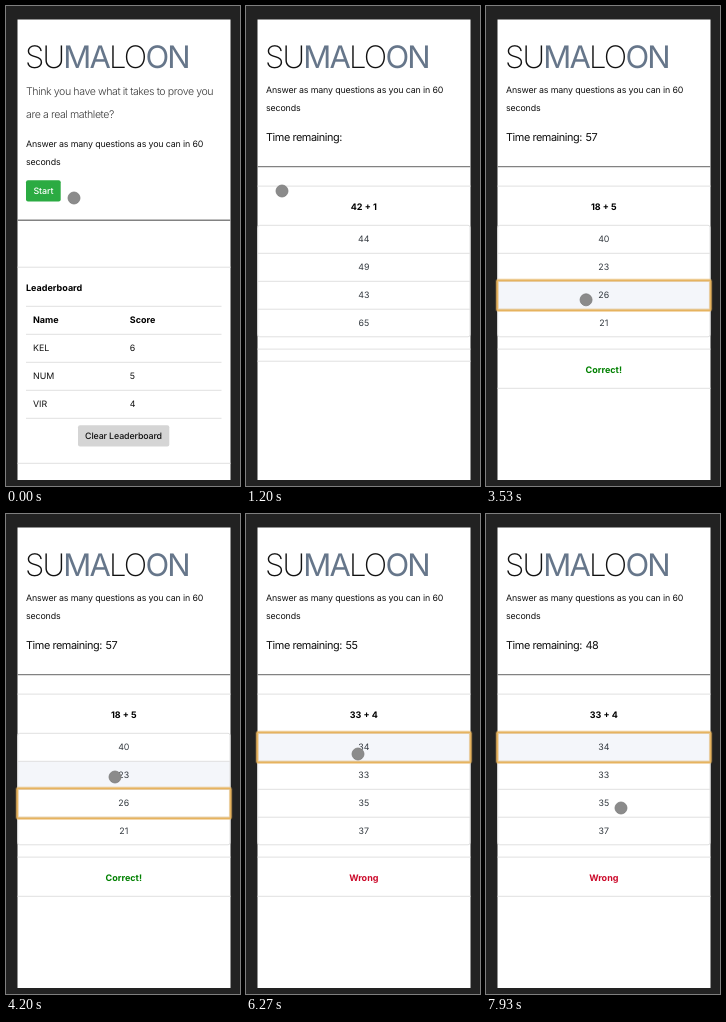
An HTML page that plays this animation: 234 px wide and 480 px high, repeating every 8000 ms.

```html
<!DOCTYPE html>
<html lang="en">
<head>
<meta charset="utf-8">
<title>Math quiz</title>
<style>
  html, body { margin: 0; width: 234px; height: 480px; overflow: hidden; background: #222; }
  svg { display: block; }
  text { font: 400 8.85px Inter, "Open Sans", sans-serif; fill: #111; text-rendering: geometricPrecision; }
  .title { font-size: 31px; font-weight: 200; letter-spacing: -1.8px; }
  .title tspan { fill: #66768a; font-weight: 400; }
  .lead { font-size: 10.6px; font-weight: 300; letter-spacing: -.41px; fill: #3c3c3c; }
  .body { letter-spacing: -.15px; }
  .time { font-size: 10.9px; letter-spacing: -.44px; }
  .bold { font-size: 9px; font-weight: 700; fill: #000; }
  .button { font-weight: 500; letter-spacing: -.12px; }
  .mid { text-anchor: middle; }
  .option { fill: #343a40; }
  .line { stroke: #e0e0e0; fill: none; }
  .rule { stroke: #828282; stroke-width: 1.4; }
</style>
</head>
<body>
<svg width="234" height="480" viewBox="0 0 234 480">
  <rect x="11.5" y="13.5" width="213" height="460.5" fill="#fff"/>
  <text class="title" x="19" y="62">SU<tspan>MA</tspan>LO<tspan>ON</tspan></text>

  <g id="home">
    <text class="lead" x="20" y="89.3">Think you have what it takes to prove you</text>
    <text class="lead" x="20" y="111.8">are a real mathlete?</text>
    <text class="body" x="20" y="141">Answer as many questions as you can in 60</text>
    <text class="body" x="20" y="159">seconds</text>
    <rect id="start" x="20" y="174.2" width="34.7" height="21.3" rx="2"/>
    <text x="37.4" y="188.2" class="mid button" style="fill:#fff">Start</text>
    <path class="rule" d="M11.5 214.3H224.5"/>
    <path class="line" d="M11.5 261.2H224.5M20 300.3H215.5M20 328.3H215.5M20 356.3H215.5M20 384.3H215.5M20 412.3H215.5M11.5 457.3H224.5"/>
    <text class="bold" x="20" y="284.8">Leaderboard</text>
    <g id="table"></g>
    <rect x="72" y="419.2" width="91.3" height="21.3" rx="2" fill="#d5d5d5"/>
    <text class="mid button" x="117.5" y="433.2">Clear Leaderboard</text>
  </g>

  <g id="quiz">
    <text class="body" x="20" y="86.5">Answer as many questions as you can in 60</text>
    <text class="body" x="20" y="104.5">seconds</text>
    <text class="time" x="20" y="134.9">Time remaining:</text>
    <text class="time" x="99.5" y="134.9" id="clock"></text>
    <path class="rule" d="M11.5 160.6H224.5"/>
    <path class="line" d="M11.5 180.1H224.5M11.5 343.1H224.5"/>
    <text class="bold mid" x="117.8" y="204.3" id="question"></text>
    <rect id="hover" x="12" width="212" height="28" fill="#f4f6fa"/>
    <rect class="line" x="11.7" y="219.3" width="212.3" height="111.5" rx="2"/>
    <path class="line" d="M12 247.3H224M12 275.3H224M12 303.2H224"/>
    <g id="focus" fill="none" stroke="#e6b35f">
      <rect x="11.2" y="-1" width="213.4" height="30" rx="1" stroke-width="3.4" opacity=".35"/>
      <rect x="11.2" y="-1" width="213.4" height="30" rx="1" stroke-width="1.8"/>
    </g>
    <g id="options"></g>
    <path class="line" id="footer"/>
    <text class="bold mid" x="117.8" y="367.4" id="result"></text>
  </g>

  <circle id="cursor" r="6" fill="#8b8b8b" stroke="#7b7b7b" stroke-width=".8"/>
</svg>

<script>
const LOOP = 8000, ROW = 28;
const $ = id => document.getElementById(id);
const rowTop = i => 219.3 + i * ROW;

// [time, value]: each value holds until the next time
const clock = [[0, ""], [1530, 59], [2530, 58], [3530, 57], [4530, 56], [5530, 55], [6530, 49], [7530, 48]];
const hover = [[0, -1], [2600, 2], [4200, 1], [5930, 0]];
const focus = [[0, -1], [2870, 2], [4400, 1], [6070, 0]];
const rounds = [
  [0, ["42 + 1", [44, 49, 43, 65], ""]],
  [2930, ["18 + 5", [40, 23, 26, 21], "Correct!"]],
  [4470, ["13 + 22", [31, 35, 17, 34], "Correct!"]],
  [6130, ["33 + 4", [34, 33, 35, 37], "Wrong"]],
];
// [begin, end, x, y]
const moves = [
  [0, 0, 68, 192], [10, 400, 36, 185], [1680, 2510, 100, 294],
  [3500, 4200, 109, 263], [5230, 5730, 112, 240], [6880, 7940, 135, 294],
];

const at = (track, t) => track.findLast(([start]) => start <= t)[1];
const ease = p => p * p * (3 - 2 * p);

function cursorAt(t) {
  let [, , x, y] = moves[0];
  for (const [begin, end, toX, toY] of moves.slice(1)) {
    const p = ease(Math.min(1, Math.max(0, (t - begin) / (end - begin))));
    x += (toX - x) * p;
    y += (toY - y) * p;
  }
  return [x, y];
}

function showRow(el, row) {
  el.style.display = row < 0 ? "none" : "";
  el.setAttribute("transform", `translate(0 ${rowTop(row)})`);
}

$("table").innerHTML = [["Name", "Score"], ["KEL", 6], ["NUM", 5], ["VIR", 4]].map((cells, i) =>
  cells.map((cell, j) =>
    `<text class="${i ? "" : "bold"}" x="${27 + 96.8 * j}" y="${317.4 + ROW * i}">${cell}</text>`).join("")).join("");
$("options").innerHTML = [0, 1, 2, 3].map(i =>
  `<text class="mid option" x="117.8" y="${rowTop(i) + 16.8}"></text>`).join("");

function draw(t) {
  const playing = t >= 600;
  $("home").style.display = playing ? "none" : "";
  $("quiz").style.display = playing ? "" : "none";

  const [x, y] = cursorAt(t);
  $("cursor").setAttribute("transform", `translate(${x} ${y})`);
  $("start").setAttribute("fill", x < 50 ? "#23963c" : "#2bab42");

  const [question, options, result] = at(rounds, t);
  $("clock").textContent = at(clock, t);
  $("question").textContent = question;
  options.forEach((n, i) => $("options").children[i].textContent = n);
  $("result").textContent = result;
  $("result").style.fill = result === "Wrong" ? "#cc0a2b" : "#008000";
  $("footer").setAttribute("d", `M11.5 ${result ? 382.3 : 355.2}H224.5`);
  showRow($("hover"), at(hover, t));
  showRow($("focus"), at(focus, t));
}

const origin = performance.now();
function tick() {
  draw((performance.now() - origin) % LOOP);
  requestAnimationFrame(tick);
}
tick();
</script>
</body>
</html>
```
